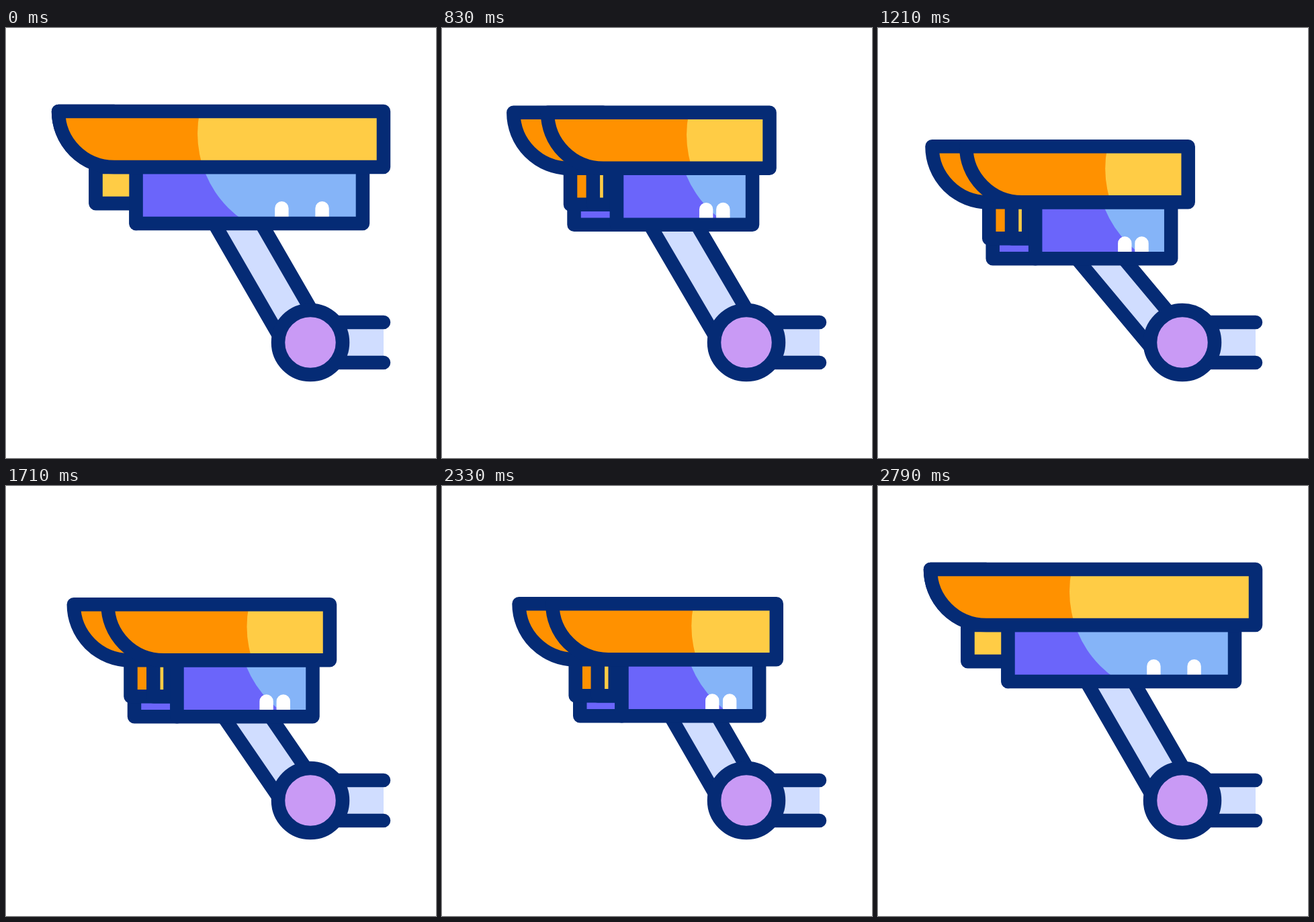
Recreate the animation shown at these times as an HTML page. Size 640x640 px, loop 3000 ms.

```html
<!DOCTYPE html>
<html lang="en">
<head>
<meta charset="utf-8">
<title>Security camera</title>
<style>
  html, body { margin: 0; width: 100%; height: 100%; overflow: hidden; background: #fff; }
  svg { display: block; width: 100%; height: 100%; }
  .line { fill: none; }
  .line, .outlined { stroke: #052b75; stroke-width: 20.5; stroke-linejoin: round; }
</style>
</head>
<body>
<svg viewBox="0 0 640 640">
  <defs>
    <clipPath id="hoodClip"><path class="hood"/></clipPath>
    <clipPath id="bodyClip"><path class="body"/></clipPath>
  </defs>

  <path id="armFill" fill="#d0ddff"/>
  <path id="armLines" class="line"/>

  <path d="M490 438H562V498H490Z" fill="#d0ddff"/>
  <path d="M490 438H562M490 498H562" class="line" stroke-linecap="round"/>
  <circle cx="453" cy="468" r="48" class="outlined" fill="#c99af5"/>

  <g id="camera">
    <path id="hoodSide" class="outlined" fill="#ff9100"/>
    <path id="bodySide" class="outlined" fill="#6b65fa"/>
    <path id="lensSide" class="outlined" fill="#ff9100"/>
    <path id="lens" class="outlined" fill="#ffcc45"/>

    <path class="body" fill="#6b65fa"/>
    <g clip-path="url(#bodyClip)">
      <circle id="bodyLight" cy="157" r="157" fill="#85b4f8"/>
      <path id="vents" fill="#fff"/>
    </g>
    <path class="body line"/>

    <path class="hood" fill="#ff9100"/>
    <g clip-path="url(#hoodClip)">
      <circle id="hoodLight" cy="157" r="157" fill="#ffcc45"/>
    </g>
    <path class="hood line"/>
  </g>
</svg>
<script>
const LOOP = 3000, FPS = 24;
const $ = id => document.getElementById(id);
const setPath = (id, d) => $(id).setAttribute('d', d);
const setAll = (name, d) =>
  document.querySelectorAll('.' + name).forEach(el => el.setAttribute('d', d));

// Smooth 0..1 progress between two steps
function ease(step, from, to) {
  const u = Math.min(1, Math.max(0, (step - from) / (to - from)));
  return u * u * (3 - 2 * u);
}

const hoodPath = (left, right) =>
  `M${left} 124H${right}V207H${left + 83}A83 83 0 0 1 ${left} 124Z`;
const boxPath = (left, right, bottom) =>
  `M${left} 207H${right}V${bottom}H${left}Z`;
const ventPath = x => `M${x} 285V268.2a10.2 10.2 0 0 1 20.4 0V285Z`;

function drawCamera(turn, dx, dy) {
  const at = (start, shift) => start + shift * turn;
  const hoodLeft = at(78, 80);
  const bodyLeft = at(193.5, 67.5);
  const lensLeft = at(133.5, 92.3);
  const lensRight = at(195, 56);

  $('camera').setAttribute('transform', `translate(${dx} ${dy})`);
  setPath('hoodSide', hoodPath(at(78, 29.3), hoodLeft + 83));
  setPath('bodySide', boxPath(at(193.5, 4), bodyLeft, 291));
  setPath('lensSide', boxPath(at(133.5, 58.5), lensRight, 261));
  setPath('lens', boxPath(lensLeft, lensRight, 261));
  setAll('hood', hoodPath(hoodLeft, at(562, -73.5)));
  setAll('body', boxPath(bodyLeft, at(531, -68), 291));
  $('hoodLight').setAttribute('cx', at(442, 80));
  $('bodyLight').setAttribute('cx', at(442, 67.5));
  setPath('vents', ventPath(at(400.2, -16.3)) + ventPath(at(460.4, -51.3)));
}

// The arm leans by moving its lines sideways, keeping their spacing
function drawArm(lean, dy) {
  const bow = 8 * lean * (1 - lean);
  const upper = 340 - 44.5 * lean + bow;
  const lower = 412.2 - 12.3 * lean + bow;
  const point = (y, gap) => `${upper + (lower - upper) * (y - 343) / 125 + gap} ${y}`;
  const top = 291 + dy;
  const left = `M${point(top, 0)}L${point(480, 0)}`;
  setPath('armLines', `${left}M${point(top, 70)}L${point(440, 70)}`);
  setPath('armFill', `${left}L${point(440, 70)}L${point(top, 70)}Z`);
}

function draw(ms) {
  const step = Math.floor((ms % LOOP + 5) / 1000 * FPS) % (LOOP / 1000 * FPS);
  const open = ease(step, -0.2, 11.8);
  const lower = ease(step, 18.9, 28.6);
  const slide = ease(step, 36, 45);
  const stay = 1 - ease(step, 55, 67);
  const dy = 52.2 * lower * stay;
  drawCamera(open * stay, (34.8 * slide - 26.8 * lower) * stay, dy);
  drawArm(lower * (1 - slide), dy);
}

const start = performance.now();
function tick() {
  draw(performance.now() - start);
  requestAnimationFrame(tick);
}
tick();
</script>
</body>
</html>
```
